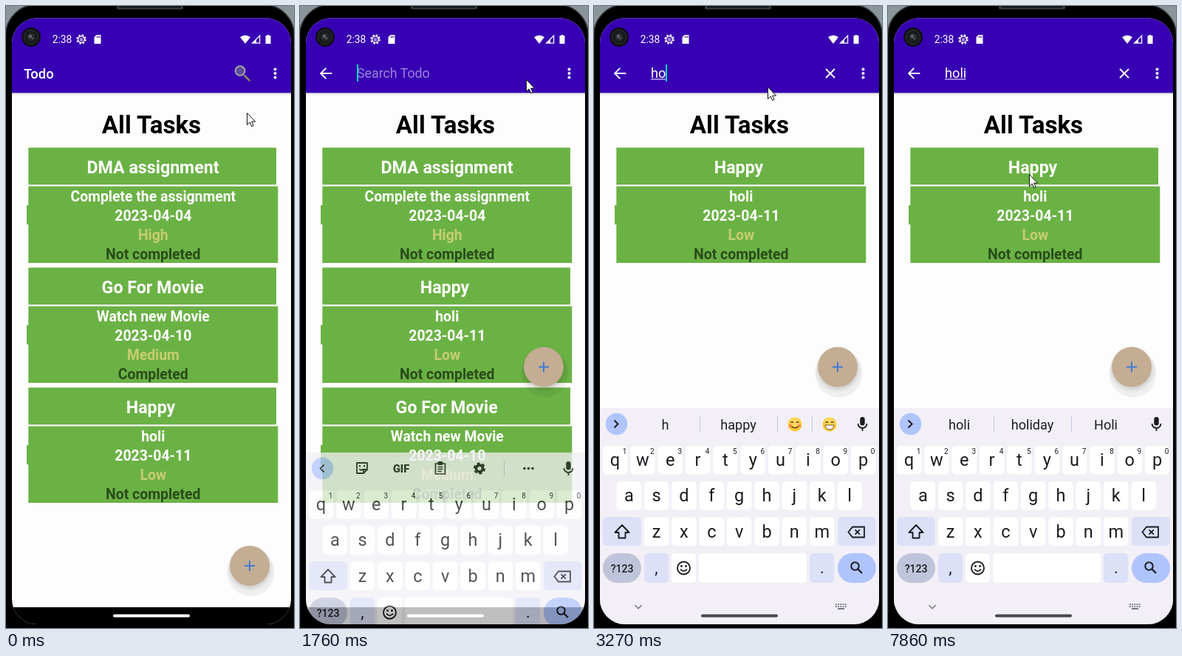
Write an HTML page that moves like this. It is 390x840 px and loops after 8 s.

```html
<!DOCTYPE html>
<html lang="en">
<head>
<meta charset="utf-8">
<title>Todo search</title>
<style>
  html, body { margin: 0; width: 100%; height: 100%; overflow: hidden; background: #8b969b; }
  svg { display: block; width: 390px; height: 840px; font-family: Roboto, "Open Sans", sans-serif; }
  text { white-space: pre; }
</style>
</head>
<body>
<svg id="stage" viewBox="0 0 390 840" xmlns="http://www.w3.org/2000/svg"></svg>
<script>
const INK = '#1b1b20', GREEN = '#6bb245', PURPLE = '#3700b3', BLUE = '#afc4fd', PALE = '#dce1f8';

// ---- drawing helpers ----
const rect = (x, y, w, h, fill, r = 0, extra = '') =>
  `<rect x="${x}" y="${y}" width="${w}" height="${h}" rx="${r}" fill="${fill}" ${extra}/>`;
const circle = (x, y, r, fill, extra = '') =>
  `<circle cx="${x}" cy="${y}" r="${r}" fill="${fill}" ${extra}/>`;
const text = (s, x, y, size, fill, weight = 400, anchor = 'middle', extra = '') =>
  `<text x="${x}" y="${y}" font-size="${size}" fill="${fill}" font-weight="${weight}" text-anchor="${anchor}" ${extra}>${s}</text>`;
const line = (x, y, d, color, w = 2, extra = '') =>
  `<path transform="translate(${x} ${y})" d="${d}" fill="none" stroke="${color}" stroke-width="${w}" ${extra}/>`;
const shape = (x, y, d, fill, extra = '') =>
  `<path transform="translate(${x} ${y})" d="${d}" fill="${fill}" ${extra}/>`;
const group = (id, body, extra = '') => `<g id="${id}" ${extra}>${body}</g>`;

// ---- task list ----
const tasks = {
  dma: ['DMA assignment', 'Complete the assignment', '2023-04-04', 'High', 'Not completed', 199],
  movie: ['Go For Movie', 'Watch new Movie', '2023-04-10', 'Medium', 'Completed', 198.7],
  happy: ['Happy', 'holi', '2023-04-11', 'Low', 'Not completed', 196]
};
function card(id) {
  const [title, note, date, level, done, cx] = tasks[id];
  const row = (s, i, fill) => text(s, 199.3, 264 + 26 * i, 19.4, fill, 700);
  return group(id,
    rect(30.3, 191.3, 335.7, 50, GREEN) + rect(30.3, 243.5, 338, 103.5, GREEN) + rect(28, 269, 3, 26, GREEN) +
    text(title, cx, 226, 23.2, '#fff', 700) +
    row(note, 0, '#fff') + row(date, 1, '#fff') + row(level, 2, '#c6cd70') + row(done, 3, '#2a4c19'));
}

// ---- status and tool bar ----
function statusBar() {
  return circle(34, 42, 13, '#101114') + circle(34, 42, 9.5, '#17191b', 'stroke="#33383a" stroke-width="1"') +
    circle(34, 42, 5.5, '#25292a') + circle(33, 41, 2.4, '#596161') + circle(36, 44, 1, '#70797a') +
    text('2:38', 62.7, 50, 13.8, '#fff', 400, 'start') +
    circle(102, 45, 5.6, 'none', 'stroke="#fff" stroke-width="2.2" stroke-dasharray="2.4 2"') +
    circle(102, 45, 4.2, 'none', 'stroke="#fff" stroke-width="1.3"') +
    line(102, 45, 'M-2-1H2M-2 1.2H2', '#fff', 1.2) +
    shape(124, 45, 'M-1.5-6H4.5V6H-4.5V-3Z', '#fff') +
    line(124, 45, 'M-.8-4.5v2.5M1-4.5v2.5M2.8-4.5v2.5', PURPLE, .9) +
    shape(324, 45, 'M0 6L-7-3Q0-8 7-3Z', '#fff') +
    line(339, 45, 'M4.6-5V5.2H-5.4Z', '#fff', 1.3) + shape(339, 45, 'M0 0V5H-5Z', '#fff') +
    shape(355, 45, 'M-1.5-6H1.5V-5H3.5V6H-3.5V-5H-1.5Z', '#fff');
}
function toolBar() {
  return [85.5, 91, 96.5].map(y => circle(364.5, y, 2, '#fff')).join('') +
    group('home', text('Todo', 24, 98, 18.4, '#fff', 500, 'start') +
      line(320, 91, 'M3 3L9.5 9.5', '#4d4450', 3.4, 'stroke-linecap="round"') +
      line(320, 91, 'M3 3L9.5 9.5', '#a49a96', 1.6, 'stroke-linecap="round"') +
      circle(317, 87.5, 6.4, '#5a4ca0', 'stroke="#a8a6a4" stroke-width="1.9"')) +
    group('search', line(35.3, 91, 'M8 0H-7M0-7.2L-7.2 0L0 7.2', '#fff', 1.9) +
      text('Search Todo', 77, 97, 17.8, '#9c82d9', 400, 'start', 'id="hint"') +
      text('', 77, 97, 18.2, '#fff', 400, 'start', 'id="query"') +
      rect(77, 98.4, 0, 1, '#fff', 0, 'id="under"') +
      rect(77, 79, 2, 23, '#03dac5', 0, 'id="caret"') +
      line(320, 91, 'M-6-6L6 6M6-6L-6 6', '#fff', 1.9, 'id="clear"'));
}

// ---- keyboard ----
function letters(keys, x0, y) {
  return [...keys].map((k, i) => {
    const x = x0 + 37.35 * i;
    return rect(x - 16.7, y - 19, 33.4, 38.5, '#fff', 5) + text(k, x, y + 8, 23.5, INK);
  }).join('');
}
function smile(x, grin) {
  const eyes = 'M-5.5-2.2q1.8-2.6 3.6 0M1.9-2.2q1.8-2.6 3.6 0';
  return circle(x, 565, 9.5, '#fdc934') + circle(x, 563, 7, '#ffd95a') + line(x, 565, eyes, '#5c3a1c', 1.4) +
    (grin ? shape(x, 565, 'M-6 1H6Q5 7 0 7T-6 1Z', '#fff', 'stroke="#6a4520" stroke-width=".9"')
          : circle(x - 6, 567, 2.2, '#f6904e') + circle(x + 6, 567, 2.2, '#f6904e') +
            line(x, 565, 'M-4.5 2.5q4.5 4.5 9 0', '#5c3a1c', 1.4));
}
const divider = x => rect(x - .5, 553, 1, 23, '#c3c8dc');
function keyboard() {
  const tools = group('tools',
    line(30, 564.5, 'M2.5-5L-2.5 0L2.5 5', INK, 2) +
    line(84, 564, 'M-7-7H7V2L2 7H-7ZM7 2H2V7M-3.5 1q2.5 4 5 0', INK, 1.8, 'stroke-linejoin="round"') +
    shape(84, 564, 'M-4-4h2v2.4h-2ZM2-4h2v2.4h-2Z', INK) +
    text('GIF', 137, 569.5, 14.5, INK, 800) +
    line(190, 564.5, 'M-6.5-6.5H6.5V7.5H-6.5ZM-3.5-2H3.5M-3.5 1H3.5M-3.5 4H1.5', INK, 1.7) +
    rect(186.5, 555, 7, 5, INK, 1.5) +
    circle(243, 564.5, 6.6, 'none', `stroke="${INK}" stroke-width="3" stroke-dasharray="3.9 3"`) +
    circle(243, 564.5, 4.4, 'none', `stroke="${INK}" stroke-width="3.6"`) +
    divider(276.5) + [304, 309.5, 315].map(x => circle(x, 564.5, 1.8, INK)).join(''));
  const words = group('words',
    line(30, 564.5, 'M-2.5-5L2.5 0L-2.5 5', INK, 2) + divider(143.5) + divider(248.5) +
    [96.5, 195.5, 295].map((x, i) => text('', x, 572, 18.1, INK, 400, 'middle', `id="word${i}"`)).join('') +
    group('faces', smile(272, false) + divider(295.5) + smile(319, true)));
  const mic = rect(360.3, 555, 6.4, 11.5, INK, 3.2) +
    line(363.5, 564.5, 'M-6-.5a6 6 0 0 0 12 0M0 5.5V9.5', INK, 1.8);
  const digits = [...'1234567890'].map((d, i) => text(d, 41.5 + 37.35 * i, 604.5, 10, INK)).join('');
  const row3 = rect(12, 690, 52, 39, PALE, 6) + rect(330, 690, 52, 39, PALE, 6) +
    line(38, 710, 'M0-9L9.5 1H4.5V8.5H-4.5V1H-9.5Z', INK, 1.9, 'stroke-linejoin="round"') +
    line(355.5, 710.5, 'M-11 0L-5.5-7H10.5V7H-5.5ZM-2-3.2L4.4 3.2M4.4-3.2L-2 3.2', INK, 1.8);
  const row4 = rect(12, 739, 52, 40, '#c0c4da', 20) + text('?123', 38, 764.5, 14, INK, 500) +
    rect(68, 739, 33, 40, PALE, 5) + text(',', 84.5, 766, 22, INK) +
    rect(105, 739, 33, 40, '#fff', 5) + circle(121.5, 759, 8.5, 'none', `stroke="${INK}" stroke-width="1.8"`) +
    circle(118.5, 756.5, 1.4, INK) + circle(124.5, 756.5, 1.4, INK) +
    line(121.5, 759, 'M-4.5 1.5Q0 7 4.5 1.5', INK, 1.7) +
    rect(142, 739, 146, 40, '#fff', 5) + rect(292, 739, 33, 40, PALE, 5) + text('.', 309, 766, 22, INK) +
    rect(330, 739, 52, 40, BLUE, 20) +
    circle(353.5, 756.5, 5.2, 'none', `stroke="${INK}" stroke-width="2"`) +
    line(353.5, 756.5, 'M3.8 3.8L9.5 9.5', INK, 2.2);
  const foot = line(60, 811.5, 'M-4.5-2.2L0 2.2L4.5-2.2', '#77767d', 1.6) +
    line(334, 811, 'M-7-3H8M-7 0H8', '#77767d', 1.8, 'stroke-dasharray="1.8 1.4"') +
    line(334, 811, 'M-4 3H5', '#77767d', 1.8);
  return rect(8, 543, 378, 293, '#f2f0f6') + circle(30.5, 564.5, 14.7, BLUE) + tools + words + mic +
    letters('qwertyuiop', 28.5, 613) + digits + letters('asdfghjkl', 47.3, 661) +
    letters('zxcvbnm', 84.6, 709.5) + row3 + row4 + foot;
}

// ---- whole stage ----
const fab = circle(331.5, 765, 32, '#000', 'opacity=".055"') +
  circle(330.5, 759, 28, '#000', 'opacity=".13" filter="url(#soft)"') +
  circle(330, 756, 27, '#c4ad92') + line(330, 756, 'M-7 0H7M0-7V7', '#3f7bd6', 2);

document.getElementById('stage').innerHTML =
  `<defs><clipPath id="screen">${rect(8, 16.3, 378, 818.7, '#000', 34)}</clipPath>
   <filter id="soft" x="-30%" y="-30%" width="160%" height="160%"><feGaussianBlur stdDeviation="2.5"/></filter></defs>` +
  rect(0, 0, 390, 840, '#8b969b') +
  rect(-.5, -2, 391, 880, '#000', 42, 'stroke="#343b3f" stroke-width="1.5"') +
  rect(150, 0, 90, 4.5, '#3a3f41', 2) + rect(153, 0, 84, 2.5, '#151718', 1) +
  `<g clip-path="url(#screen)">` +
    rect(8, 16, 378, 820, '#fdfdfd') + rect(8, 812, 378, 24, '#000') +
    rect(8, 117, 378, 1.5, '#000', 0, 'opacity=".15"') + rect(8, 118.5, 378, 2, '#000', 0, 'opacity=".05"') +
    rect(8, 16, 378, 101.3, PURPLE) + statusBar() + toolBar() +
    text('All Tasks', 197, 172, 33.1, '#000', 700) +
    Object.keys(tasks).map(card).join('') +
    group('fab', fab) + group('keys', keyboard()) + rect(145, 821.6, 104, 3.9, '#fff', 1.9, 'id="pill"') +
  `</g>` +
  group('mouse', shape(0, 0, 'M.5.5V16.5L4.2 13L6.7 18.6L9.1 17.6L6.7 12.1H11.6Z', '#fff', 'stroke="#111" stroke-width="1"'));

// ---- timeline: each row holds from its time until the next ----
const LOOP = 8000;
const mousePath = [
  [0, 326, 144], [500, 334, 136], [650, 333, 118], [800, 327, 105], [950, 321, 96],
  [1640, 314, 97], [1760, 306, 99], [1900, 284, 103], [2040, 262, 107], [2170, 245, 109], [2310, 235, 109],
  [5700, 246, 109], [6010, 280, 112], [6150, 298, 122], [6290, 296, 152], [6430, 272, 190], [6570, 236, 222],
  [6730, 209, 227], [6860, 206, 231], [7000, 215, 230],
  [7150, 226, 229], [7290, 230, 228], [7430, 221, 228], [7570, 207, 228], [7720, 197, 227], [7860, 191, 227]
];
const keysMotion = [[0, 300, 0], [1640, 165, .32], [1760, 60, .75], [1900, 8, 1], [2040, 0, 1]];
const fabLift = [[0, 0], [1760, -268.5]];
const pillColor = [[0, '#fff'], [2040, '#c5c3ca'], [2580, '#87858b'], [2730, '#49484d']];
const typed = [[0, '', 77], [3000, 'h', 86.5], [3270, 'ho', 97], [3540, 'hol', 101], [4930, 'holi', 105.5]];
const wordSets = [[0], [3130, 'h', 'happy', ''], [3690, 'hol', 'holi', 'holiday'], [5200, 'holi', 'holiday', 'Holi']];
const lists = [[0, 'dma', 'movie', 'happy'], [1640, 'dma', 'happy', 'movie'], [3270, 'happy']];
const caretOn = [[0, 0], [1640, 1], [2580, 0], [3000, 1], [4250, 0], [4650, 1], [5700, 0],
  [6150, 1], [6730, 0], [7150, 1], [7720, 0]];

const at = (rows, t) => rows.findLast(r => r[0] <= t).slice(1);
const el = {};
document.querySelectorAll('#stage [id]').forEach(n => el[n.id] = n);
const show = (id, on) => el[id].setAttribute('display', on ? 'inline' : 'none');
const move = (id, x, y) => el[id].setAttribute('transform', `translate(${x} ${y})`);

function draw(t) {
  const searching = t >= 1640;
  show('home', !searching);
  show('search', searching);
  move('mouse', ...at(mousePath, t));

  const [drop, alpha] = at(keysMotion, t);
  move('keys', 0, drop);
  el.keys.setAttribute('opacity', alpha);
  move('fab', 0, at(fabLift, t)[0]);
  el.pill.setAttribute('fill', at(pillColor, t)[0]);

  const [query, end] = at(typed, t);
  el.query.textContent = query;
  el.under.setAttribute('width', end - 77);
  el.caret.setAttribute('x', end);
  show('hint', !query);
  show('clear', query);
  show('caret', at(caretOn, t)[0]);

  const words = at(wordSets, t);
  show('tools', !words.length);
  show('words', words.length);
  words.forEach((w, i) => el['word' + i].textContent = w);
  show('faces', words[2] === '');

  const list = at(lists, t);
  for (const id in tasks) {
    const i = list.indexOf(id);
    show(id, i >= 0);
    move(id, 0, 162 * i);
  }
}

function tick() {
  draw(performance.now() % LOOP);
  requestAnimationFrame(tick);
}
tick();
</script>
</body>
</html>
```
